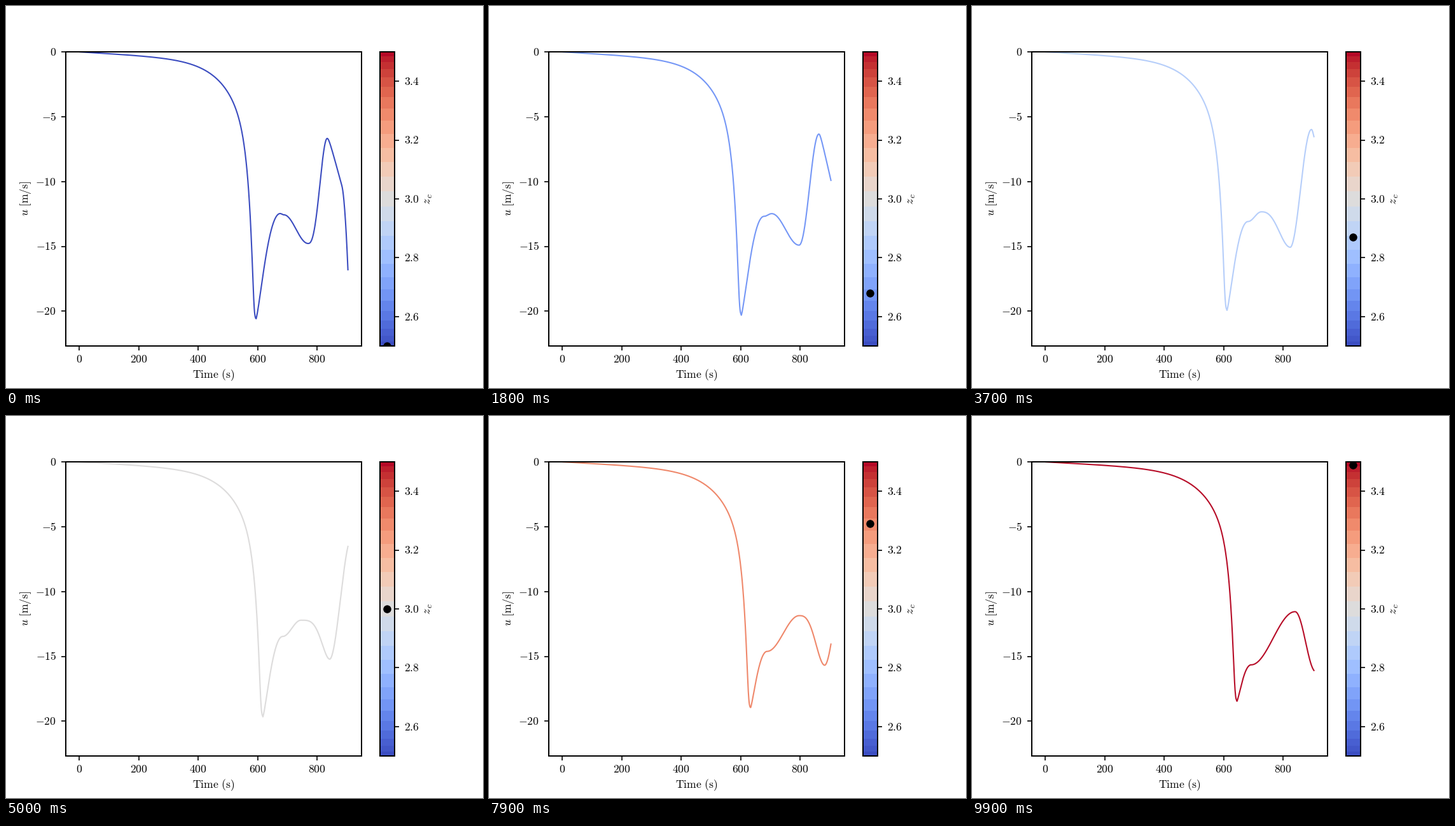
Write a matplotlib script that moves like this. It is 750 px wide and 600 px high and loops after 10000 ms.

```python
import numpy as np
import matplotlib.pyplot as plt
from matplotlib.animation import FuncAnimation

W, H, DPI = 750, 600, 150
FRAMES, INTERVAL = 100, 100
Z_MIN, Z_MAX = 2.5, 3.5
T_END, U_MIN = 903, -22.68
LEFT, RIGHT, TOP, BOTTOM = 93.75, 558.75, 72, 534
BAR_X, BAR_W = 587.8, 23.1
X0, X1 = 114.89, 537.61          # stage x of t = 0 and t = T_END

plt.rcParams.update({"mathtext.fontset": "cm", "axes.linewidth": .96})
cmap = plt.get_cmap("coolwarm")


def ease(x, a, b, power):
    """Half-cosine step from 0 at a to 1 at b, bent by a power."""
    s = np.clip((x - a) / (b - a), 0, 1) ** power
    return (1 - np.cos(np.pi * s)) / 2


def turning_points(k):
    """Stage positions of trough, shoulder, hump, dip and late peak."""
    return [
        (393 + 19.6 * k + 4.2 * k**2, 492 - 33 * k - 11.5 * k**2),
        (431 + 8 * k, 326 + 15 * k + 51 * k**2),
        (437 + 35 * k + 37 * k**2, 328 - 8 * k - 13 * k**2),
        (475 + 70 * k - 4 * k**2, 373 + 14 * k + 15 * k**3),
        (505 + 74 * k + 10 * k**2, 208 - 38 * k),
    ]


def descent(x, k, vx, vy):
    """Slow drift, then two exponentials that level off at the trough."""
    d = np.maximum(vx - x, 0)
    r = (.00014 * (x - X0) + .42 * np.exp(-(.029 - .0025 * k) * d)
         + .88 * np.exp(-.137 * d))
    r[0] = 0
    return TOP + (vy - TOP) * r / (1 + r**12) ** (1 / 12)


def recovery(x, k, points):
    """Eased steps through the turning points, then the last fall."""
    powers = [.65, 1, 1 + 1.1 * np.exp(-((k - .6) / .2) ** 2),
              .93 + .35 * np.exp(-6 * k)]
    y = np.full_like(x, points[0][1])
    for (xa, ya), (xb, yb), p in zip(points, points[1:], powers):
        y += (yb - ya) * ease(x, xa, xb, p)
    dx = np.maximum(x - points[-1][0], 0)
    y += np.hypot(12, (3.7 + 4 * k) * dx) - 12
    return y + 1.05 * np.maximum(dx - 23, 0) ** 2


t = np.linspace(0, T_END, 1000)
stage_x = X0 + t / T_END * (X1 - X0)


def velocity(k):
    points = turning_points(k)
    vx, vy = points[0]
    y = np.where(stage_x < vx, descent(stage_x, k, vx, vy),
                 recovery(stage_x, k, points))
    return U_MIN * (y - TOP) / (BOTTOM - TOP)


fig = plt.figure(figsize=(W / DPI, H / DPI), dpi=DPI, facecolor="white")


def panel(x, w):
    return fig.add_axes([x / W, 1 - BOTTOM / H, w / W, (BOTTOM - TOP) / H])


def put(x, y, s, ha="center", rotation=0, size=8.5):
    fig.text(x / W, 1 - y / H, f"${s}$", size=size, ha=ha, va="baseline",
             rotation=rotation, rotation_mode="anchor")


ax = panel(LEFT, RIGHT - LEFT)
ax.set(xlim=(-.05 * T_END, 1.05 * T_END), ylim=(U_MIN, 0),
       xticks=range(0, 801, 200), yticks=range(-20, 1, 5))
ax.tick_params(labelbottom=False, labelleft=False)
for v in range(0, 801, 200):
    put(X0 + v / T_END * (X1 - X0), 560.2, v)
for v in range(-20, 1, 5):
    put(79.2, TOP + v / U_MIN * (BOTTOM - TOP) + 5.8, v, ha="right")
put(326.25, 584.2, r"\mathrm{Time\ (s)}")
put(35.2, 302, r"u\ \mathrm{[m/s]}", rotation=90)

# Colour bar in steps that widen towards the middle
bar = panel(BAR_X, BAR_W)
s = np.linspace(-1, 1, 28)
edges = (Z_MIN + Z_MAX) / 2 + (.35 * s + .65 * np.sin(np.pi / 2 * s)) / 2
mid = (edges[1:] + edges[:-1]) / 2
bar.pcolormesh([0, 1], edges, mid[:, None], cmap=cmap, vmin=Z_MIN, vmax=Z_MAX)
bar.set(xlim=(0, 1), ylim=(Z_MIN, Z_MAX), xticks=[],
        yticks=np.arange(2.6, 3.5, .2))
bar.yaxis.tick_right()
bar.tick_params(labelright=False)
for v in bar.get_yticks():
    put(625.5, BOTTOM - (v - Z_MIN) * (BOTTOM - TOP) + 5.8, f"{v:.1f}", ha="left")
put(668, 303, r"z_{\,c}", rotation=90, size=9)

line, = ax.plot([], [], lw=1)
dot, = bar.plot([], [], "o", color="black", ms=6, mew=0)


def update(i):
    k = i / FRAMES
    line.set_data(t, velocity(k))
    line.set_color(cmap(k))
    dot.set_data([.5], [Z_MIN + k * (Z_MAX - Z_MIN)])
    return line, dot


anim = FuncAnimation(fig, update, frames=FRAMES, interval=INTERVAL,
                     repeat=True, repeat_delay=0)
plt.show()
```
